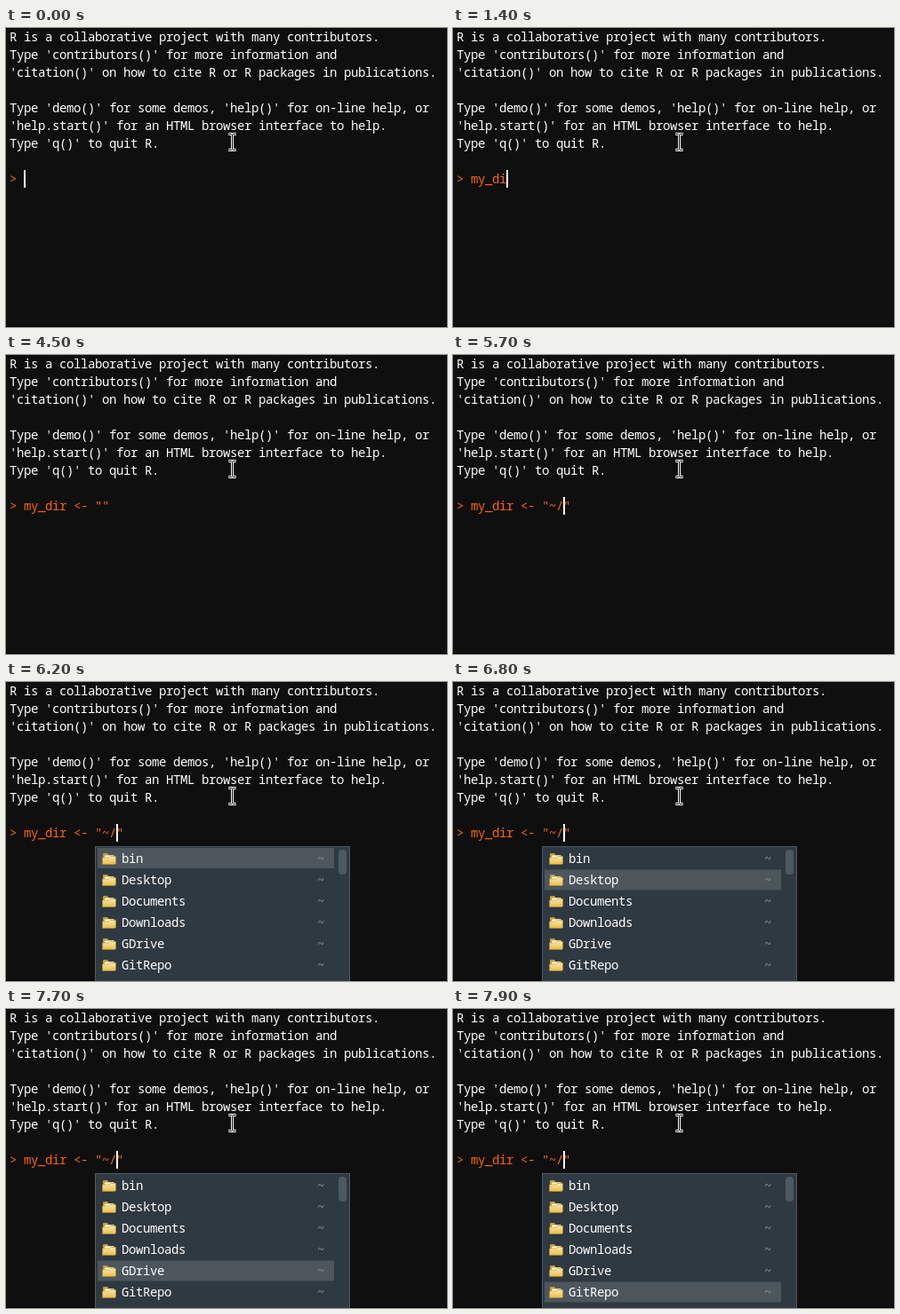
Recreate the animation shown at these times as an HTML page. Size 496 by 337 pixels, loop 8000 ms.

```html
<!DOCTYPE html>
<html lang="en">
<head>
<meta charset="utf-8">
<title>Console path completion</title>
<style>
html, body { margin: 0; width: 100%; height: 100%; overflow: hidden; background: #0f0f0f; }
svg { display: block; }
text { font: 14px "Ubuntu Mono", "Noto Sans Mono", monospace; letter-spacing: -.4px; fill: #fff; white-space: pre; }
.code { fill: #f60; }
.tilde { fill: #87919a; }
</style>
</head>
<body>
<svg width="496" height="337" viewBox="0 0 496 337">
  <defs>
    <linearGradient id="front" x2="0" y2="1">
      <stop stop-color="#fbe9a4"/>
      <stop offset="1" stop-color="#e6bd4e"/>
    </linearGradient>
    <g id="folder">
      <path d="M1 13V3q0-1 1-1h4l1.500 2H13q1 0 1 1v8z" fill="#c79a35"/>
      <path d="M3 4.500h10v3H3z" fill="#fffbe6"/>
      <path d="M.5 14.500V7H8l1.500-1.500h6v8l-1 1z" fill="url(#front)" stroke="#b98d2c" stroke-width=".6"/>
    </g>
  </defs>
  <rect y="336" width="496" height="1"/>
  <g id="intro"></g>
  <text id="line" class="code" x="4" y="175"></text>
  <rect id="compose" x="108" y="180" width="8" height="1" fill="#f60"/>
  <rect id="caret" y="160" width="2" height="20" fill="#fff"/>
  <g id="menu">
    <rect x="100.500" y="185.500" width="286" height="160" fill="#2f3941" stroke="#4b5963"/>
    <rect id="pick" x="103" width="266" height="23" fill="#4d565d"/>
    <rect x="374" y="189" width="9" height="28" rx="4" fill="#4d5861"/>
    <g id="rows"></g>
  </g>
  <g fill="none">
    <path id="beam" d="M250.500 119.500h3l1 1 1-1h3M254.500 120.500v16M250.500 137.500h3l1-1 1 1h3" stroke="#fff" stroke-width="3"/>
    <use href="#beam"/>
    <path d="M250.500 119.500h3l1 1 1-1h3M254.500 120.500v16M250.500 137.500h3l1-1 1 1h3" stroke="#000"/>
  </g>
</svg>
<script>
const get = id => document.getElementById(id);
const LOOP = 8000;
const intro = [
  "R is a collaborative project with many contributors.",
  "Type 'contributors()' for more information and",
  "'citation()' on how to cite R or R packages in publications.",
  "",
  "Type 'demo()' for some demos, 'help()' for on-line help, or",
  "'help.start()' for an HTML browser interface to help.",
  "Type 'q()' to quit R."
];
const folders = ["bin", "Desktop", "Documents", "Downloads", "GDrive", "GitRepo"];
const typed = 'my_dir <- "~/';

get("intro").innerHTML = intro.map((s, i) => `<text x="4" y="${15 + 20 * i}">${s}</text>`).join("");
get("rows").innerHTML = folders.map((name, i) => {
  const y = 204 + 24 * i;
  return `<use href="#folder" x="108" y="${y - 13}"/><text x="130" y="${y}">${name}</text>` +
    `<text class="tilde" x="350" y="${y}">~</text>`;
}).join("");

// [time, characters before the caret]
const keys = [[0, 0], [700, 1], [800, 2], [1100, 3], [1300, 4], [1400, 5], [1900, 6],
  [2100, 7], [2300, 8], [2600, 10], [2900, 11], [5300, 12], [5700, 13]];
const blinks = [100, 500, 3500, 3900, 4500, 4900, 6300, 6700, 7300, 7700];
const picks = [6800, 7000, 7200, 7700, 7900];
const passed = (times, t) => times.filter(x => x <= t).length;
const show = (id, on) => get(id).setAttribute("visibility", on ? "visible" : "hidden");

function draw(t) {
  const count = keys.filter(k => k[0] <= t).pop()[1];
  get("line").textContent = "> " + typed.slice(0, count) + (count > 10 ? '"' : "");
  get("caret").setAttribute("x", 20 + 8 * count);
  show("caret", passed(blinks, t) % 2 === 0);
  show("compose", t >= 5300 && t < 5400);
  show("menu", t >= 6200);
  get("pick").setAttribute("y", 187 + 24 * passed(picks, t) + (t >= 6800 ? .5 : 0));
}

const start = performance.now();
function tick() {
  draw((performance.now() - start) % LOOP);
  requestAnimationFrame(tick);
}
tick();
</script>
</body>
</html>
```
